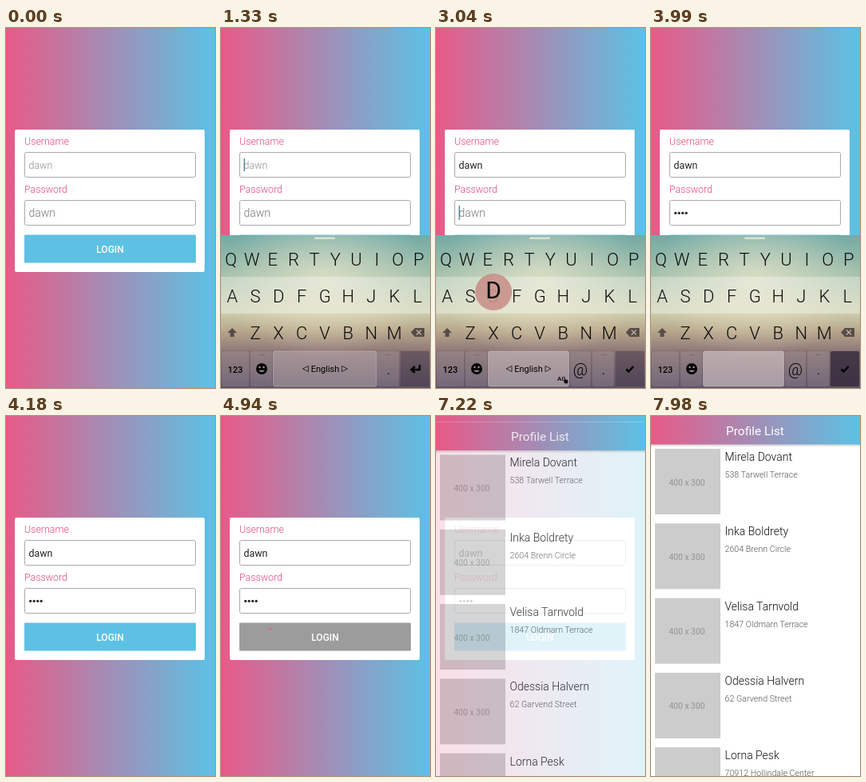
Write an HTML page that moves like this. It is 262 by 450 pixels and loops after 8000 ms.

```html
<!DOCTYPE html>
<html lang="en">
<head>
<meta charset="utf-8">
<title>Login to profile list</title>
<style>
  html, body { margin: 0; width: 100%; height: 100%; overflow: hidden; background: #fff; }
  svg { display: block; width: 100vw; height: 100vh; font-family: Roboto, sans-serif; }
  .label { font-size: 12.4px; font-weight: 300; fill: #e0457f; }
  .field { fill: #fff; stroke: #aaa; }
  .mid { text-anchor: middle; }
  .key { font-size: 22px; font-weight: 300; fill: #0c0c0c; text-anchor: middle; }
  .name { font-size: 14px; font-weight: 300; fill: #111; }
  .street { font-size: 10.7px; font-weight: 300; fill: #555; }
</style>
</head>
<body>
<svg viewBox="0 0 262 450" preserveAspectRatio="none">
  <defs>
    <linearGradient id="sky">
      <stop offset="0" stop-color="#e85a87"/><stop offset="1" stop-color="#5bc2e5"/>
    </linearGradient>
    <linearGradient id="board" x2="0" y2="1">
      <stop offset="0" stop-color="#74aaa5"/><stop offset=".27" stop-color="#a9c2ac"/>
      <stop offset=".5" stop-color="#cdcfae"/><stop offset=".62" stop-color="#b9a98c"/>
      <stop offset=".76" stop-color="#8f7878"/><stop offset="1" stop-color="#655669"/>
    </linearGradient>
    <radialGradient id="glow" cx=".5" cy=".3" r=".5">
      <stop offset="0" stop-color="#f3ecd2" stop-opacity=".65"/>
      <stop offset="1" stop-color="#f3ecd2" stop-opacity="0"/>
    </radialGradient>
    <linearGradient id="shade" x2="0" y2="1">
      <stop offset="0" stop-opacity=".22"/><stop offset="1" stop-opacity="0"/>
    </linearGradient>
  </defs>

  <rect width="262" height="450" fill="url(#sky)"/>
  <rect x="11" y="127" width="238" height="178" rx="2" fill="#fff"/>
  <text class="label" x="23" y="146">Username</text>
  <text class="label" x="23" y="206">Password</text>
  <rect class="field" x="23.5" y="155.5" width="214" height="31" rx="2"/>
  <rect class="field" x="23.5" y="215.5" width="214" height="31" rx="2"/>
  <text id="user" x="28.5" y="175.5" font-size="12.4"/>
  <text id="hint" x="28.5" y="236" font-size="14" font-weight="300" fill="#777">dawn</text>
  <g id="dots" fill="#222"></g>
  <rect id="caret" width="1.2"/>
  <rect id="button" x="23" y="258.5" width="215" height="35" rx="1"/>
  <rect id="touch" x="60" y="265" width="3" height="2" fill="#e85a87"/>
  <text class="mid" x="130.5" y="280.5" font-size="12" font-weight="500" fill="#fff">LOGIN</text>

  <g id="keyboard">
    <rect y="259" width="262" height="191" fill="url(#board)"/>
    <rect y="259" width="262" height="191" fill="url(#glow)"/>
    <rect y="311" width="262" height="46" fill="#fff" opacity=".3"/>
    <rect x="117" y="261.5" width="26" height="2.5" rx="1" fill="#e9eee2" opacity=".75"/>
    <g id="letters"></g>
    <path d="M14 375l6 6h-3.5v5h-5v-5h-3.5z" fill="#564c49"/>
    <path d="M238 380.5l5-5.500h12v11h-12z" fill="#564c49"/>
    <path d="M245 377.5l6 6m0-6l-6 6" stroke="#c5b3a2" stroke-width="1.3"/>
    <rect y="403" width="262" height="47" fill="#3b3042" opacity=".12"/>
    <g fill="#eee" opacity=".14">
      <rect x="1" y="404" width="34" height="44" rx="2"/>
      <rect x="37" y="404" width="27" height="44" rx="2"/>
      <rect x="196" y="404" width="27" height="44" rx="2"/>
      <rect id="atKey" x="168" y="404" width="26" height="44" rx="2"/>
    </g>
    <rect id="space" x="65.5" y="404" height="44" rx="2" fill="#f2e6e4" stroke="#e6dadd" stroke-opacity=".4"/>
    <rect id="action" x="225" y="404" width="36" height="44" rx="2" fill="#2f2738"/>
    <text class="mid" x="18" y="430.5" font-size="11" font-weight="500">123</text>
    <circle cx="51" cy="426" r="7"/>
    <g fill="#a5949c"><circle cx="48.5" cy="424" r="1.2"/><circle cx="53.5" cy="424" r="1.2"/></g>
    <path d="M47 428q4 4 8 0z" fill="#a5949c"/>
    <g fill="#2a222c" opacity=".7" font-size="9" class="mid">
      <text x="51" y="409">...</text><text x="210" y="409">...</text>
    </g>
    <text class="mid" x="210" y="433" font-size="15">.</text>
    <g id="language">
      <text class="mid" y="430" font-size="11">English</text>
      <path d="M-21 422.5v7M-21 422.5l-7 3.5 7 3.5M21 422.5l7 3.5-7 3.5z" fill="none" stroke="#111" stroke-width=".8"/>
    </g>
    <g id="secure">
      <text class="mid" x="181" y="434" font-size="20" font-weight="300">@</text>
    </g>
    <g id="badge">
      <text x="152" y="441" font-size="8" font-weight="500">AG</text><circle cx="163" cy="442" r="2.5"/>
    </g>
    <path id="enter" d="M249 421v6h-10m4-4l-4.500 4 4.500 4" fill="none" stroke="#000" stroke-width="2.5"/>
    <path id="check" d="M238.5 426.5l3 3 6-6.500" fill="none" stroke="#000" stroke-width="2.5"/>
    <g id="popup">
      <circle r="23" fill="#c9938d" opacity=".92"/>
      <text class="key" y="8" style="font-size:30px;font-weight:400"></text>
    </g>
  </g>

  <g id="list">
    <rect width="262" height="490" fill="#fff"/>
    <g id="rows"></g>
    <rect y="35" width="262" height="4" fill="url(#shade)"/>
    <rect width="262" height="35.5" fill="url(#sky)"/>
    <text class="mid" x="130.5" y="24" font-size="15.4" fill="#fff">Profile List</text>
  </g>
</svg>
<script>
const $ = id => document.getElementById(id);
const LOOP = 8000, STEP = 190, WORD = 'dawn';
const USER_START = 1710, PASS_START = 3040;
const T = { focusUser: 1140, open: 1330, focusPass: 2660, done: 3990, close: 4180, press: 4940, release: 5320, list: 7100 };

const people = [
  ['Mirela Dovant', '538 Tarwell Terrace'],
  ['Inka Boldrety', '2604 Brenn Circle'],
  ['Velisa Tarnvold', '1847 Oldmarn Terrace'],
  ['Odessia Halvern', '62 Garvend Street'],
  ['Lorna Pesk', '70912 Hollindale Center']
];
$('rows').innerHTML = people.map(([name, street], i) => `<g transform="translate(0 ${i * 93.3})">
  <rect x="5" y="41" width="82" height="82" fill="#ccc"/>
  <text class="mid" x="45" y="86.5" font-size="10.3" fill="#929292">400 x 300</text>
  <text class="name" x="92.5" y="56">${name}</text>
  <text class="street" x="92.5" y="77">${street}</text></g>`).join('');

const keys = {};
[['QWERTYUIOP', 12.5, 26.15, 289], ['ASDFGHJKL', 14, 29.05, 335], ['ZXCVBNM', 43, 29.05, 381]]
  .forEach(([row, x, gap, y]) => [...row].forEach((c, i) => { keys[c] = [x + i * gap, y]; }));
$('letters').innerHTML = Object.entries(keys)
  .map(([c, [x, y]]) => `<text class="key" x="${x}" y="${y + 8}">${c}</text>`).join('');
$('dots').innerHTML = [...WORD].map((_, i) => `<circle cx="${30.7 + i * 4.5}" cy="231.3" r="1.6"/>`).join('');

const show = (id, on) => $(id).setAttribute('visibility', on ? 'inherit' : 'hidden');
const set = (id, attrs) => { for (const k in attrs) $(id).setAttribute(k, attrs[k]); };
const typed = (t, start) => Math.max(0, Math.min(WORD.length, Math.floor((t - start) / STEP)));
const keyDown = (t, start) => t >= start ? WORD[Math.floor((t - start) / STEP)] : undefined;

function drawForm(t) {
  const userCount = typed(t, USER_START), passCount = typed(t, PASS_START);
  const user = $('user');
  user.textContent = userCount ? WORD.slice(0, userCount) : WORD;
  set('user', { fill: userCount ? '#222' : '#8c8c8c', 'font-weight': userCount ? 400 : 300 });
  show('hint', !passCount);
  [...$('dots').children].forEach((dot, i) => dot.setAttribute('visibility', i < passCount ? 'visible' : 'hidden'));

  const inPass = t >= T.focusPass;
  const blinkOn = t < T.done || (t - T.done + 590) % 1000 < 500;
  show('caret', t >= T.focusUser && blinkOn);
  const advance = inPass ? passCount * 4.5 : userCount ? user.getComputedTextLength() : 0;
  set('caret', { x: 28.6 + advance, y: inPass ? 222 : 163, height: inPass ? 18 : 16, fill: t < T.done ? '#2c7480' : '#5d82c4' });

  const pressed = t >= T.press && t < T.release;
  set('button', { fill: pressed ? '#9c9c9c' : '#5dc1e3' });
  show('touch', pressed && t < T.press + STEP);
}

function drawKeyboard(t) {
  const secure = t >= T.focusPass, done = t >= T.done;
  show('keyboard', t >= T.open && t < T.close);
  set('space', { width: secure ? 101 : 129.5, 'fill-opacity': done ? .5 : secure ? .42 : .3 });
  set('language', { transform: `translate(${secure ? 116 : 130.5} 0)` });
  set('action', { opacity: done ? .75 : .3 });
  show('language', !done);
  show('badge', secure && !done);
  for (const id of ['secure', 'atKey', 'check']) show(id, secure);
  show('enter', !secure);

  const letter = (keyDown(t, PASS_START) || keyDown(t, USER_START) || '').toUpperCase();
  show('popup', letter);
  if (letter) {
    const [x, y] = keys[letter];
    set('popup', { transform: `translate(${Math.max(24, x)} ${y - 5})` });
    $('popup').lastElementChild.textContent = letter;
  }
}

function drawList(t) {
  const p = Math.max(0, Math.min(1, (t - T.list) / 280));
  const eased = 1 - (1 - p) ** 3;
  show('list', p > 0);
  set('list', { opacity: eased, transform: `translate(0 ${40 * (1 - eased)})` });
}

const origin = performance.now();
function frame(now) {
  const t = Math.floor((Math.max(0, now - origin) % LOOP) / STEP) * STEP;
  drawForm(t);
  drawKeyboard(t);
  drawList(t);
  requestAnimationFrame(frame);
}
frame(origin);
</script>
</body>
</html>
```
